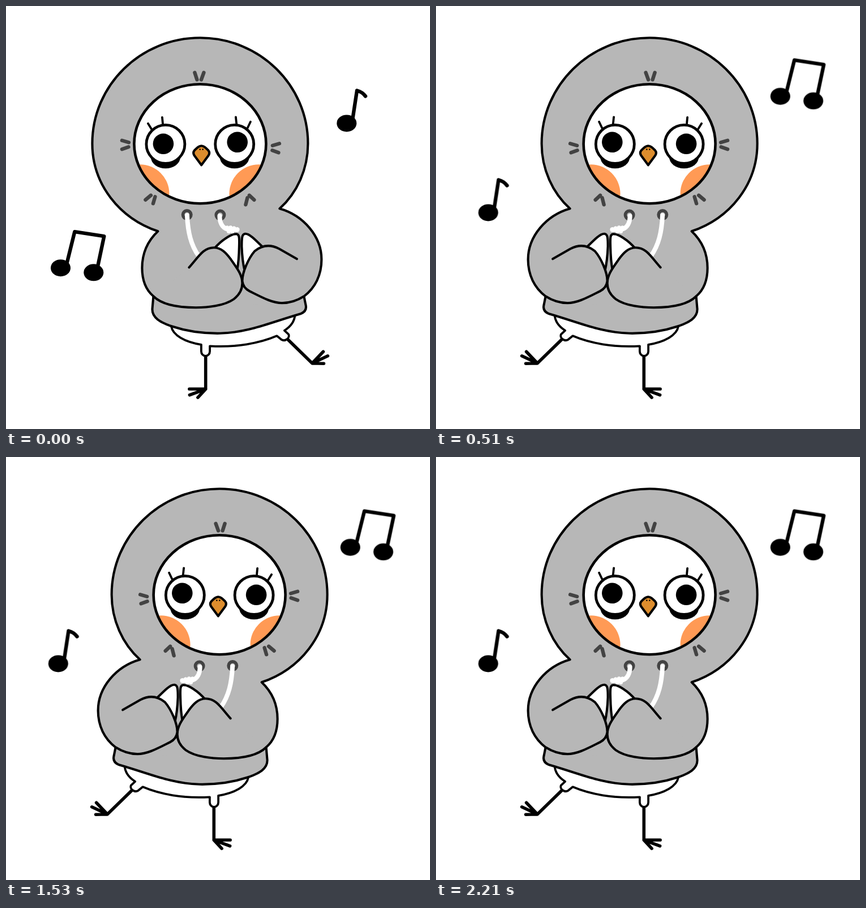
These frames come from a looping animation (749x748 px, 2710 ms). An HTML page without scripts:

```html
<!DOCTYPE html>
<html lang="en">
<head>
<meta charset="utf-8">
<title>Dancing bird in a hoodie</title>
<style>
  html, body { margin: 0; width: 100%; height: 100%; overflow: hidden; background: #fff; }
  svg { display: block; width: 100%; height: 100%; }

  .line { fill: none; stroke: #000; stroke-width: 4.1; stroke-linecap: round; stroke-linejoin: round; }
  .grey { fill: #b7b7b7; }
  .white { fill: #fff; }
  .cheek { fill: #ff9a55; }
  .beak { fill: #dd8d2d; }
  .limb { stroke-width: 5.6; }
  .note { stroke-width: 6.4; }
  .seam { stroke: #434343; stroke-width: 6.4; }
  .ring { stroke: #434343; stroke-width: 5.6; }
  .cord { stroke: #fff; stroke-width: 8; }
  .frill { stroke-width: 6.8; stroke-dasharray: .1 6.2; }

  /* Every part jumps between its home pose and --alt on each beat. */
  .dance { animation: beat 2710ms step-end infinite; }
  .bird { --alt: matrix(-1, 0, 0, 1, 720, 0); }
  .single { --alt: translate(-509.5px, 158px); }
  .double { --alt: translate(511.7px, -303.5px); }
  @keyframes beat {
    0%, 12.546%, 25.092%, 37.638%, 50.184%, 62.73%, 75.276% { transform: none; }
    6.273%, 18.819%, 31.365%, 43.911%, 56.457%, 69.003%, 81.549%, 100% { transform: var(--alt); }
  }
</style>
</head>
<body>
<svg viewBox="0 0 749 748" preserveAspectRatio="none">
  <defs>
    <ellipse id="face" cx="342.5" cy="243.5" rx="116.5" ry="105.5"/>
    <clipPath id="inFace"><use href="#face"/></clipPath>
    <ellipse id="head" rx="17.5" ry="15"/>
    <g id="eye">
      <ellipse cy="23" rx="26" ry="20"/>
      <circle class="line white" r="34" style="stroke-width:4.8"/>
    </g>
  </defs>

  <g class="dance single">
    <use href="#head" x="601.8" y="207.4"/>
    <path class="line note" d="M612.3 200L620 149.5Q629.5 152 635 159.5"/>
  </g>

  <g class="dance double">
    <use href="#head" x="96.5" y="463.2"/>
    <use href="#head" x="154.8" y="471.3"/>
    <path class="line note" d="M107.5 455L121.3 399.2L173.3 407.2L161.3 464"/>
  </g>

  <g class="dance bird">
    <g transform="translate(.4 .3)">
      <!-- legs and belly -->
      <path class="line limb" d="M352.3 618V677M323.5 677H352.3L324 687.5M352.3 677L338.5 692"/>
      <path class="line limb" d="M498 590L540.5 631.5L560 611M568 618.5L540.5 631.5L561 632"/>
      <path class="line white" style="stroke-width:3.8" d="M291.5 566C294 582 316 594 344.5 598.5V610.5a7.6 8 0 0 0 15.2 0V601C405 604 448 596 478 583L486 589.5C493 594 502 586 498.5 580L491.5 573.5C503 566 510 556 510 545"/>

      <!-- hoodie -->
      <path class="line grey" d="M260 513L258 536C258 551 272 559 292 566C322 576 348 579 378 578.5C428 577 465 560 520 544C528 541 531 536 529 528L526 513Z"/>
      <path class="grey" d="M260 513L268 398L483 358L526 513L487 525L335 533Z"/>
      <path class="line grey" d="M260 513C247 502 240 484 240 463C240 438 250 415 268 398C200 375 152 315 152 243C152 140 237 56 342.5 56C448 56 533 140 533 243C533 288 514 330 483 358C525 370 557 407 557 448C557 475 546 498 526 513"/>
      <path class="line seam" d="M333 117.5L337 130M349 117.5L344.5 130M204.5 237.5L216.5 241M204.5 253L216 249M482.5 243L470.5 246.5M481 259L470 255M246 342.5L255.5 334.5M259.5 349L263 337M423 351L426 339M438 342.5L429.5 334.5"/>

      <!-- drawstrings -->
      <circle class="line ring" cx="319.3" cy="368.8" r="7.2"/>
      <circle class="line ring" cx="378" cy="369.3" r="7.2"/>
      <path class="line cord" d="M319.5 370C321 400 326 422 340 442"/>
      <path class="line cord" d="M377 371C377 383 382 392 391 394.5L408 395.5"/>
      <path class="line cord frill" d="M390 391.5Q399 390.5 409 394.5M393 398.5H402"/>

      <!-- hands and sleeves -->
      <path class="line white" d="M368 428C380 414 398 402 407 403C412 404 412 410 411.5 425Q411 450 408 466"/>
      <path class="line white" d="M455 428C441 414 430 402 422 402.5C416 403 416 412 416 425Q417 450 421 467"/>
      <path class="line grey" d="M323 462C340 443 348 427 367 427C380 427 389 437 397 448C408 464 417 475 417 490C417 501 411 511 402 518C385 530 355 533 335 533C305 533 275 528 260 513"/>
      <path class="line grey" d="M513.5 447L482 429Q459 417 439 433C428 446 417 470 417 486C418 495 422 500 430 504C452 515 470 525 487 525C502 525 515 520 526 513"/>

      <!-- face -->
      <use href="#face" class="white"/>
      <g class="cheek" clip-path="url(#inFace)">
        <circle cx="236.5" cy="331.5" r="51.5"/>
        <circle cx="446" cy="332" r="52"/>
      </g>
      <use href="#face" class="line" style="stroke-width:4.6"/>
      <path class="line" style="stroke-width:3.8" d="M250.5 207.5L257 218M275.5 196.5L276.8 210M405.5 196L407 210M431.5 204.5L426 216"/>
      <use href="#eye" x="281.5" y="244"/>
      <use href="#eye" x="403.3" y="244"/>
      <circle cx="277.5" cy="243.5" r="18.3"/>
      <circle cx="408.3" cy="240.5" r="18.3"/>
      <path class="line beak" d="M344.8 247C349 247 352 250 357 255Q360.5 259 357 264.5L344.8 281L332.6 264.5Q329 259 332.5 255C337.5 250 340.5 247 344.8 247Z"/>
      <circle cx="342.3" cy="253.3" r="1.3"/>
      <circle cx="347.3" cy="253.3" r="1.3"/>
    </g>
  </g>
</svg>
</body>
</html>
```
